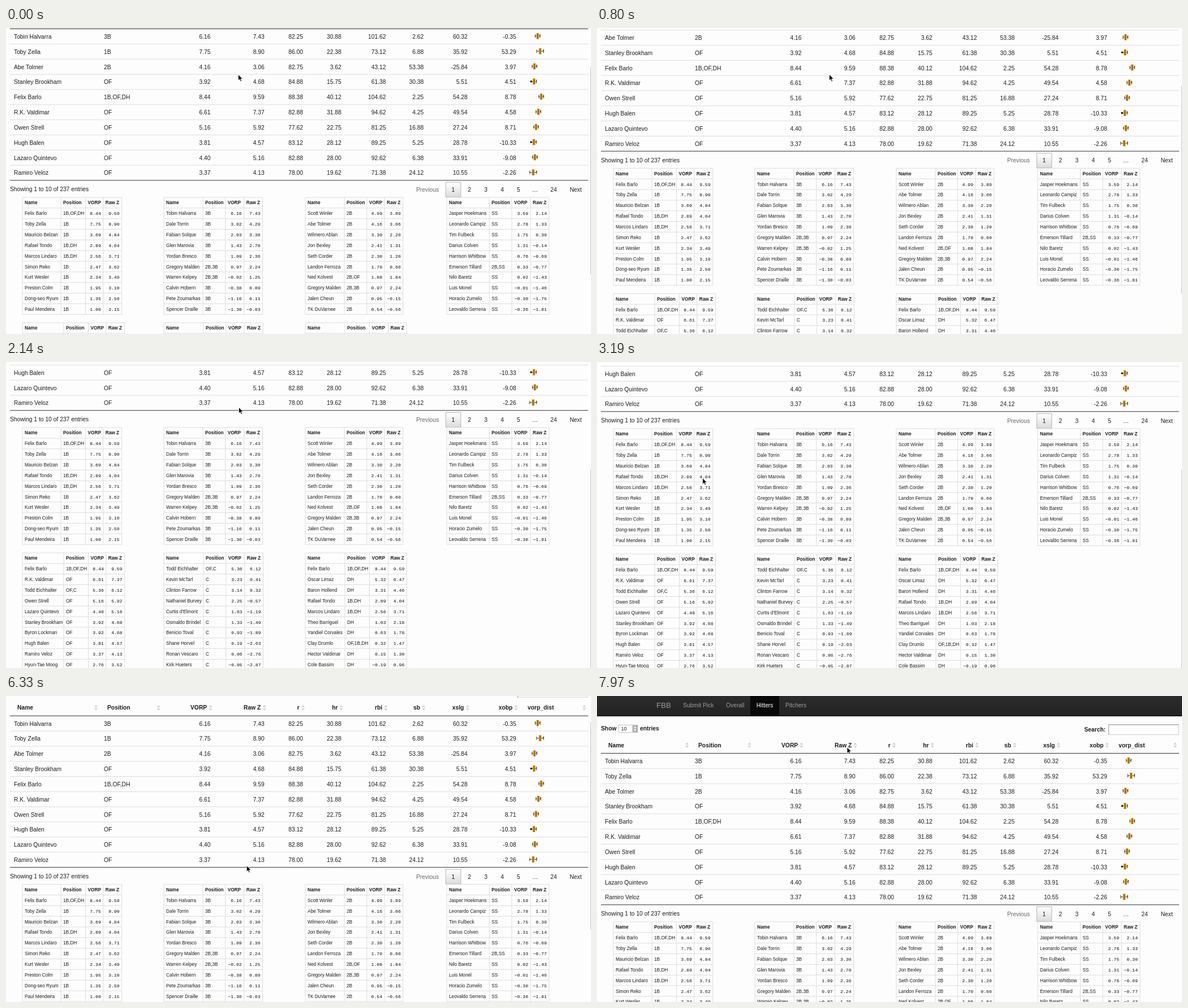
Animation of 1034x542 px, one loop 8 s. Source, as an HTML page:

```html
<!DOCTYPE html>
<html lang="en">
<head>
<meta charset="utf-8">
<title>Hitters</title>
<style>
  html, body { margin: 0; width: 100%; height: 100%; overflow: hidden; background: #fdfdfd; }
  svg { display: block; width: 1034px; height: 542px; }
  text { font: 10.3px "Liberation Sans", Arial, sans-serif; fill: #1c1c1c; white-space: pre; }
  .b { font-weight: bold; }
  .s { font-size: 8.25px; }
  .m { font: 8.1px "Liberation Mono", monospace; fill: #0c0c0c; }
  .nav { fill: #9d9d9d; }
  .brand { font-size: 13.25px; }
  .on { fill: #fff; }
  .off { fill: #666; }
  .tiny { font-size: 9px; }
</style>
</head>
<body>
<svg viewBox="0 0 1034 542">
  <defs>
    <linearGradient id="navFill" x2="0" y2="1"><stop stop-color="#2c2c2c"/><stop offset="1" stop-color="#222"/></linearGradient>
    <linearGradient id="btnFill" x2="0" y2="1"><stop stop-color="#fff"/><stop offset="1" stop-color="#dcdcdc"/></linearGradient>
  </defs>
  <g id="page"></g>
  <rect id="thumb" x="1033" width="1" height="368" fill="#c4c4c4"/>
  <path id="cursor" d="M0 0V10.8L2.5 8.5L4.2 12.4L6 11.6L4.3 7.8H7.7Z" fill="#000" stroke="#fff" stroke-width=".8"/>
</svg>
<script>
// name|positions|VORP|remaining stats, only for the players of the main table
const players = `Tobin Halvarra|3B|6.16|82.25 30.88 101.62 2.62 60.32 -0.35
Toby Zella|1B|7.75|86.00 22.38 73.12 6.88 35.92 53.29
Abe Tolmer|2B|4.16|82.75 3.62 43.12 53.38 -25.84 3.97
Stanley Brookham|OF|3.92|84.88 15.75 61.38 30.38 5.51 4.51
Felix Barlo|1B,OF,DH|8.44|88.38 40.12 104.62 2.25 54.28 8.78
R.K. Valdimar|OF|6.61|82.88 31.88 94.62 4.25 49.54 4.58
Owen Strell|OF|5.16|77.62 22.75 81.25 16.88 27.24 8.71
Hugh Balen|OF|3.81|83.12 28.12 89.25 5.25 28.78 -10.33
Lazaro Quintevo|OF|4.40|82.88 28.00 92.62 6.38 33.91 -9.08
Ramiro Veloz|OF|3.37|78.00 19.62 71.38 24.12 10.55 -2.26
Mauricio Belzan|1B|3.69
Rafael Tondo|1B,DH|2.89
Marcos Lindaro|1B,DH|2.56
Simon Reko|1B|2.47
Kurt Wesler|1B|2.34
Preston Colm|1B|1.95
Dong-seo Ryum|1B|1.35
Paul Mendeira|1B|1.00
Dale Torrin|3B|3.02
Fabian Solque|3B|2.03
Glen Marovia|3B|1.43
Yordan Bresco|3B|1.09
Gregory Malden|2B,3B|0.97
Warren Kelpey|2B,3B|-0.02
Calvin Hobern|3B|-0.38
Pete Zoumarkas|3B|-1.16
Spencer Draille|3B|-1.30
Scott Winler|2B|4.99
Wilmero Ablan|2B|3.30
Jon Bexley|2B|2.41
Seth Corder|2B|2.30
Landon Ferroza|2B|1.70
Ned Kolvest|2B,OF|1.08
Jalen Cheun|2B|0.95
TK DuVarnee|2B|0.54
Jasper Hoekmans|SS|3.59
Leonardo Campiz|SS|2.78
Tim Fulbeck|SS|1.75
Darius Colven|SS|1.31
Harrison Whitbow|SS|0.76
Emerson Tillard|2B,SS|0.33
Nilo Baretz|SS|0.02
Luis Monel|SS|-0.01
Horacio Zumelo|SS|-0.30
Leovaldo Serrena|SS|-0.36
Todd Eichhalter|OF,C|5.36
Byron Lockman|OF|3.92
Hyun-Tae Moog|OF|2.76
Kevin McTarl|C|3.23
Clinton Farrow|C|3.14
Nathaniel Burvey|C|2.25
Curtis d'Elmont|C|1.63
Osmaldo Brindel|C|1.33
Benicio Toval|C|0.93
Shane Horvel|C|0.19
Ronan Vescaro|C|0.06
Kirk Hueters|C|-0.05
Oscar Limaz|DH|5.32
Baron Hollend|DH|3.31
Theo Barriguel|DH|1.03
Yandiel Corvales|DH|0.63
Clay Drumlo|OF,1B,DH|0.32
Hector Valdimar|DH|0.15
Cole Bassim|DH|-0.19`.split("\n").map(row => {
  const [name, pos, vorp, stats] = row.split("|");
  return { name, pos, vorp, z: rawZ(pos, vorp), stats: stats && stats.split(" ") };
});

// Raw Z is VORP plus the replacement level of the player's best position
function rawZ(pos, vorp) {
  const level = { "1B": 1.153, DH: 1.153, "3B": 1.27, "2B": -1.1, SS: -1.453, OF: .76, C: -2.82 };
  return (+vorp + Math.max(...pos.split(",").map(p => level[p]))).toFixed(2);
}

const $ = id => document.getElementById(id);
let out = "";
const text = (x, y, str, cls = "", anchor = "start") =>
  out += `<text x="${x}" y="${y}" class="${cls}" text-anchor="${anchor}">${str}</text>`;
const rect = (x, y, w, h, fill, stroke = "none") =>
  out += `<rect x="${x}" y="${y}" width="${w}" height="${h}" fill="${fill}" stroke="${stroke}"/>`;
const path = (d, stroke, fill = "none", width = 1) =>
  out += `<path d="${d}" stroke="${stroke}" fill="${fill}" stroke-width="${width}"/>`;

function navbar() {
  rect(0, 0, 1034, 35, "url(#navFill)");
  rect(271, 0, 51, 35, "#080808");
  rect(0, 35, 1034, 1, "#080808");
  text(105, 21.2, "FBB", "nav brand");
  text(152, 20.3, "Submit Pick", "nav");
  text(228, 20.3, "Overall", "nav");
  text(281.7, 20.3, "Hitters", "on");
  text(333, 20.3, "Pitchers", "nav");
}

function controls() {
  text(7, 61.2, "Show", "b");
  rect(38, 51.5, 34, 13, "#fff", "#c4c4c4");
  rect(62.5, 52, 9.5, 12, "#b4b4b4");
  path("M65 57L67.2 54L69.4 57ZM65 59L67.2 62L69.4 59Z", "none", "#fff");
  text(42.5, 61.2, "10", "tiny");
  text(76, 61.2, "entries", "b");
  text(899, 63.2, "Search:", "b", "end");
  rect(904.5, 50.5, 123.5, 18, "#fff", "#ccc");
  path("M904.5 69V51H1028", "#999");
}

function boxplot(vorp, i, y) {
  const mid = 922.4 + 2.8 * vorp, half = i % 8 == 1 ? 6 : 4.2, outlier = i % 4 == 3;
  path(`M${mid - half} ${y}H${mid + half}v-3v6` + (outlier ? "" : `M${mid - half} ${y - 3}v6`), "#222", "none", .9);
  rect(mid - 2.4, y - 5.2, 4.8, 10.4, "#e69a10");
  path(`M${mid} ${y - 5.2}v10.4`, "#7a5010", "none", 1.3);
  if (outlier) out += `<circle cx="${mid - 5}" cy="${y}" r="1.7"/>`;
}

function mainTable() {
  const right = [361.5, 456.7, 525, 592.8, 671.5, 738.3, 815.7, 901.7];
  text(20, 90.8, "Name", "b");
  text(179, 90.8, "Position", "b");
  "VORP,Raw Z,r,hr,rbi,sb,xslg,xobp".split(",").forEach((h, i) =>
    text(right[i] - 6.3, 90.8, h, "b", "end"));
  text(922, 90.8, "vorp_dist", "b");
  [159, 269.5, ...right, 1022].forEach(x =>
    path(`M${x - 3} 86.2l3 -4l3 4ZM${x - 3} 88l3 4l3 -4Z`, "none", "#d2d2d2"));
  players.filter(p => p.stats).forEach((p, i) => {
    const mid = 115.1 + i * 26.83, base = mid + 3.8;
    if (i) path(`M7 ${mid - 13.5}H1029`, "#ddd");
    text(14, base, p.name);
    text(173, base, p.pos);
    [p.vorp, p.z, ...p.stats].forEach((n, k) => text(right[k], base, n, "", "end"));
    boxplot(p.vorp, i, mid - .8);
  });
  path("M7 101.5H1029M7 369.8H1029", "#333");
}

function pager() {
  text(7, 389.2, "Showing 1 to 10 of 237 entries");
  text(725, 390, "Previous", "off");
  rect(777.3, 373.3, 26.5, 26, "url(#btnFill)", "#b4b4b4");
  ["1", "2", "3", "4", "5", "…"].forEach((s, i) => text(790.3 + i * 28.9, 390, s, "", "middle"));
  text(968, 390, "24", "", "middle");
  text(1007, 390, "Next", "", "middle");
}

// the ten best players at one position
function rankTable([pos, nameWidth], i) {
  const best = players.filter(p => p.pos.split(",").includes(pos))
    .sort((a, b) => b.vorp - a.vorp).slice(0, 10);
  const widths = [nameWidth, best.some(p => p.pos.length > 5) ? 43.5 : 39.7,
    best.some(p => p.vorp < 0) ? 33 : 31.3, 32.8];
  const cols = [29 + i % 4 * 250], top = i < 4 ? 400 : 622, h = 18.85;
  widths.forEach((w, k) => cols.push(cols[k] + w));

  let grid = "";
  for (let r = 0; r <= 11; r++) grid += `M${cols[0]} ${top + r * h}H${cols[4]}`;
  cols.forEach(c => grid += `M${c} ${top}v${11 * h}`);
  path(grid, "#ddd");
  ["Name", "Position", "VORP", "Raw Z"].forEach((s, k) => text(cols[k] + 4, top + 12.4, s, "s b"));
  best.forEach((p, r) => {
    const y = top + (r + 1) * h + 12.4;
    text(cols[0] + 4, y, p.name, "s");
    text(cols[1] + 4, y, p.pos, "s");
    [p.vorp, p.z].forEach((n, k) => text(cols[k + 3] - 4, y, n.replace("-", "−"), "m", "end"));
  });
}

navbar();
controls();
mainTable();
pager();
[["1B", 68], ["3B", 69], ["2B", 69], ["SS", 75.3], ["OF", 73], ["C", 70], ["DH", 70]].forEach(rankTable);
$("page").innerHTML = out;

// start, end, distance of each scroll gesture
const scrolls = [[20, 770, 51.6], [920, 1520, 73.4], [1670, 2120, 59], [2270, 2420, -2], [5870, 6527, -282]];
// time, x, y
const cursorPath = [[1820, 410.5, 82.3], [2120, 411.5, 80.2], [2270, 411.5, 80.2], [3170, 186.7, 205.7],
  [3920, 184, 301], [4370, 374, 191], [4670, 433, 128], [5120, 427.7, 204.3], [5420, 424.5, 277],
  [5720, 425.3, 300.5], [6470, 425.3, 300.5], [7070, 393, 150], [7370, 427, 42], [7970, 442, 90.7]];

const clamp = f => Math.min(1, Math.max(0, f));
const ease = f => f * f * (3 - 2 * f);
const scrollAt = t => scrolls.reduce((y, [a, b, d]) => y + d * ease(clamp((t - a) / (b - a))), 100);

function cursorAt(t) {
  const i = Math.max(1, cursorPath.findIndex(k => k[0] >= t));
  const [t0, x0, y0] = cursorPath[i - 1], [t1, x1, y1] = cursorPath[i];
  const f = clamp((t - t0) / (t1 - t0));
  return [x0 + (x1 - x0) * f, y0 + (y1 - y0) * f];
}

function draw() {
  const now = performance.now() % 8000;
  const t = Math.floor((now - 20) / 150) * 150 + 20; // the picture advances in 150 ms steps
  const scroll = scrollAt(t);
  $("page").setAttribute("transform", `translate(0 ${-scroll})`);
  $("cursor").setAttribute("transform", `translate(${cursorAt(t)})`);
  $("thumb").setAttribute("y", 2 + scroll * .665);
  $("thumb").setAttribute("opacity", t < 3200 || t > 6000 && t < 7200 ? 1 : 0);
  requestAnimationFrame(draw);
}
draw();
</script>
</body>
</html>
```
